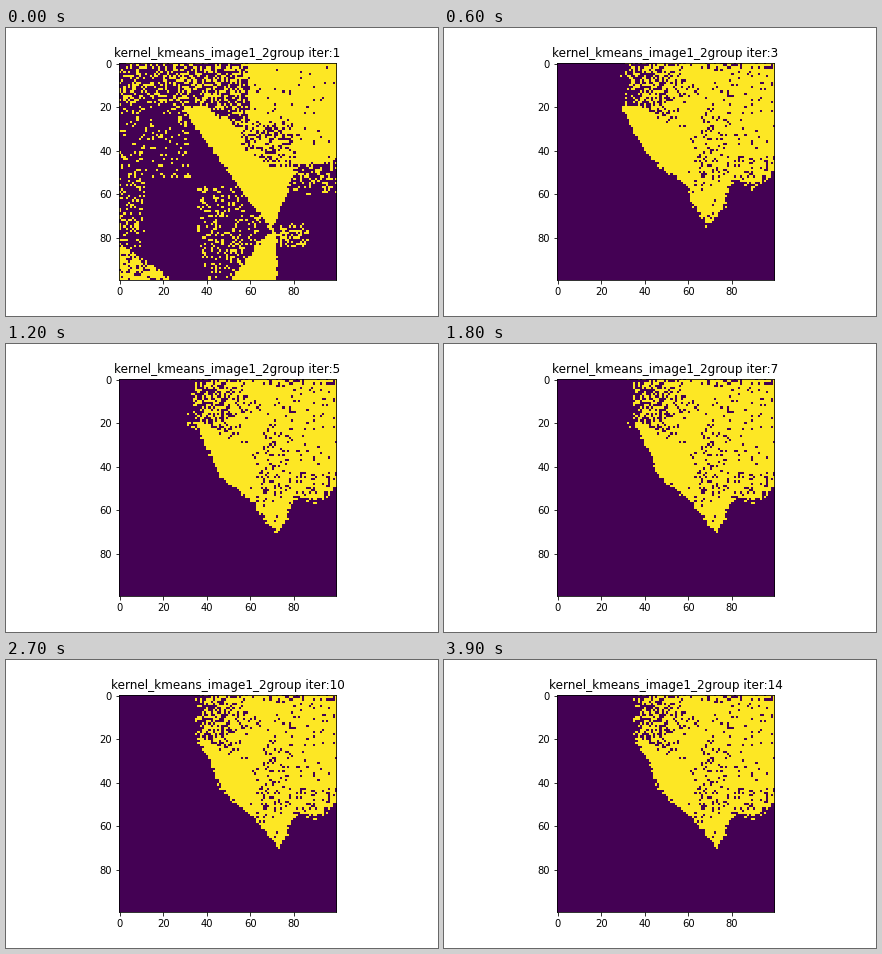
A matplotlib script that plays this animation: 432x288 px, repeating every 4200 ms.

```python
import numpy as np
import matplotlib.pyplot as plt
from matplotlib.animation import FuncAnimation

SIZE = 100
STEPS = 14
rng = np.random.default_rng(7)
row, col = np.mgrid[0:SIZE, 0:SIZE].astype(float)
noise = rng.random((SIZE, SIZE))
x = col + rng.uniform(-0.9, 0.9, col.shape)
y = row + rng.uniform(-0.9, 0.9, row.shape)

# Lower outline of the bright cluster: after the second step, when converged
EARLY = np.array([(28, 20), (34, 35), (44, 46), (59, 57), (60, 65), (67, 76),
                  (76, 67), (78, 57), (82, 53), (89, 58), (100, 50)])
LATE = np.array([(36, 20), (43, 34), (46, 43), (61, 56), (67, 62), (73, 70),
                 (76, 65), (78, 58), (82, 54), (90, 57), (100, 49)])


def box(left, top, right, bottom):
    return (x > left) & (x < right) & (y > top) & (y < bottom)


def first_step():
    chance = np.zeros((SIZE, SIZE))
    upper = 20 + .62 * (x - 38)
    lower = 20 + 1.38 * (x - 28)
    band = (x > 28) & (y > 20) & (y > upper) & (y < lower)
    shore = 47 + 2.6 * np.clip(81 - x, 0, None) - .1 * np.clip(x - 81, 0, None)

    # Speckled dark areas
    chance[box(-2, -2, 62, 20)] = .36
    chance[box(30, -2, 62, 36) & (y < upper + 2)] = .42
    chance[box(-2, 19, 32, 38)] = .14
    chance[box(-2, 38, 11, 85)] = .2
    chance[box(-2, 64, 9, 76)] = .36
    chance[box(12, 36, 32, 53)] = .07
    chance[box(35, 57, 57, 99) & (x > 35 + .2 * (y - 75))] = .24
    chance[(y > 83) & (x < 1.3 * (y - 83) + 2)] = .77
    chance[box(79, 44, 101, 60)] = .26
    chance[box(58, 69, 64, 84)] = .25
    chance[box(73, 74, 86, 84)] = .48

    # Bright areas: upper right, diagonal band, lower wedge
    chance[(x > 59) & (y < shore) & (y < lower)] = .97
    chance[band & (y < shore)] = 1
    chance[box(55, 27, 80, 48) & (y < upper + 8)] = .62
    chance[(y > 77) & (x > 69 - .85 * (y - 77)) & (x < 72)] = 1
    return noise < chance


def bright_density():
    chance = np.where(col < 60, 1.0, .94)
    chance[(col > 62) & (col < 80) & (row > 22) & (row < 53)] = .84
    chance[(col > 80) & (row > 42)] = .8
    chance[(row < 3) & (col > 60)] = .75
    grainy = (col < 66) & (row < 20 + .7 * np.clip(col - 38, 0, 18))
    ramp = np.interp(col, [8, 28, 45, 66], [.02, .2, .52, .92])
    ramp += np.where((col > 36) & (row > 16), .2, 0)
    chance[grainy] = ramp[grainy]
    return chance


def later_step(step):
    shrink = np.interp(step, [1, 2, 3, 4, 8, 12], [0, .2, .5, .75, .97, 1])
    left = np.interp(step, [1, 2, 8], [9, 25, 33])
    outline = EARLY + shrink * (LATE - EARLY)
    depth = np.interp(x, outline[:, 0], outline[:, 1])
    area = (x > outline[0, 0]) & (y < depth)
    fade = np.clip((col - left) / 8, 0, 1)
    fringe = (row < 23) & (col < 38) & (col >= left)
    mask = area & (noise < DENSITY)
    mask |= fringe & (noise < (.8 if step == 1 else .4) * fade * DENSITY)
    if step == 1:
        mask |= (abs(col - 61) < 2) & (abs(row - 79) < 4) & (noise < .4)
    return mask


DENSITY = bright_density()
masks = [first_step()] + [later_step(k) for k in range(1, STEPS)]

plt.rcParams["font.family"] = "DejaVu Sans"
fig, ax = plt.subplots(figsize=(6, 4), dpi=72, facecolor="white")
fig.subplots_adjust(left=.125, right=.9, bottom=.125, top=.88)
image = ax.imshow(masks[0], cmap="viridis", vmin=0, vmax=1,
                  interpolation="nearest")
title = ax.set_title("", fontsize=12)


def draw(step):
    image.set_data(masks[step])
    title.set_text(f"kernel_kmeans_image1_2group iter:{step + 1}")
    return image, title


anim = FuncAnimation(fig, draw, frames=STEPS, interval=300, repeat=True,
                     repeat_delay=0)
plt.show()
```
